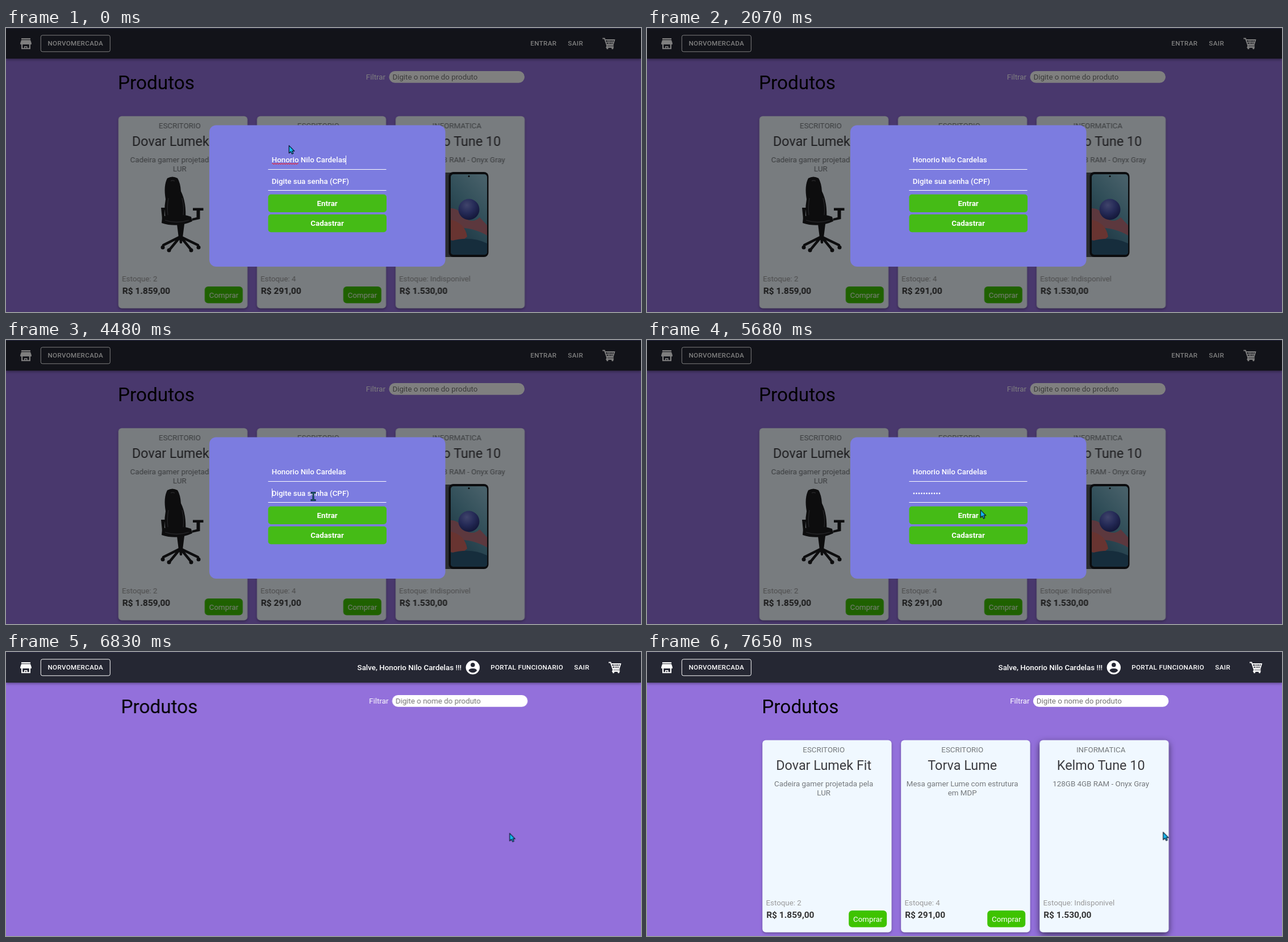
Animation, 1118 px wide and 501 px high, one loop 8000 ms. Source, as an HTML page:

```html
<!DOCTYPE html>
<html lang="pt-BR">
<head>
<meta charset="utf-8">
<title>Produtos</title>
<style>
html, body { margin: 0; width: 100%; height: 100%; overflow: hidden; background: #9370db; }
svg { display: block; width: 1118px; height: 501px; font: 13.333px Roboto, sans-serif; }
.mid { text-anchor: middle; }
.white { fill: #fff; }
.menu { font-size: 11.667px; font-weight: 500; letter-spacing: .333px; fill: #fff; }
.bar { fill: #252733; filter: drop-shadow(0 2px 2px rgba(0,0,0,.35)); }
.line { fill: none; stroke: #fff; }
.hint { fill: #757575; }
.paper { fill: #f0f8ff; filter: drop-shadow(0 2px 2px rgba(0,0,0,.3)); }
.soft { fill: #74787b; text-anchor: middle; }
.name { font-size: 23.4px; fill: #3c3c40; text-anchor: middle; }
.stock { fill: #999; }
.price { font-size: 15.5px; font-weight: 700; fill: #333; }
.buy { fill: #3ec300; }
.field { font-weight: 500; fill: #fff; }
.action { fill: #45bb16; }
.label { font-weight: 700; fill: #fff; text-anchor: middle; }

/* 8 s loop: 1% = 80 ms, hard changes unless a keyframe says otherwise */
.before, .after, .page, .cards, .lift, .press, .caret1, .squiggle, .caret2, .caret3,
.empty, .dots, .cursor, .arrow, .beam { animation: 8s step-end infinite; }
.before { animation-name: before; }
.after { animation-name: after; }
.page { animation-name: page; }
.cards { animation-name: cards; }
.lift { animation-name: lift; }
.press { animation-name: press; }
.caret1 { animation-name: caret1; }
.squiggle { animation-name: squiggle; }
.caret2 { animation-name: caret2; }
.caret3 { animation-name: caret3; }
.empty { animation-name: empty; }
.dots { animation-name: dots; }
.cursor { animation-name: cursor; }
.arrow { animation-name: arrow; }
.beam { animation-name: beam; }

@keyframes before { 0% { opacity: 1 } 85.375%, 100% { opacity: 0 } }
@keyframes after { 0% { opacity: 0 } 85.375%, 100% { opacity: 1 } }
@keyframes page { 0% { transform: translate(-5.4px, 0) } 85.375%, 100% { transform: none } }
@keyframes cards { 0% { opacity: 1 } 85.375% { opacity: 0 } 93.625%, 100% { opacity: 1 } }
@keyframes lift {
  0% { filter: drop-shadow(0 2px 2px rgba(0,0,0,.3)) }
  94.625%, 100% { filter: drop-shadow(0 4px 6px rgba(0,0,0,.6)) }
}
@keyframes press { 0% { fill: #45bb16 } 79%, 100% { fill: #4acb14 } }
@keyframes caret1 {
  0%, 9%, 21.5% { opacity: 1 }
  2.75%, 15.25%, 25.875%, 100% { opacity: 0 }
}
@keyframes squiggle { 0% { opacity: 1 } 25.875%, 100% { opacity: 0 } }
@keyframes caret2 { 0% { opacity: 0 } 52.875% { opacity: 1 } 58.25%, 100% { opacity: 0 } }
@keyframes caret3 { 0% { opacity: 0 } 58.25% { opacity: 1 } 64.5%, 100% { opacity: 0 } }
@keyframes empty { 0% { opacity: 1 } 58.25%, 100% { opacity: 0 } }
@keyframes dots { 0% { opacity: 0 } 58.25%, 100% { opacity: 1 } }
@keyframes arrow {
  0%, 42.25%, 63% { opacity: 1 }
  12.125%, 49% { opacity: 0 }
  100% { opacity: 1 }
}
@keyframes beam { 0% { opacity: 0 } 49% { opacity: 1 } 63%, 100% { opacity: 0 } }
@keyframes cursor {
  0% { transform: translate(498px, 207px) }
  .75% { transform: translate(502px, 208px) }
  2.375% { transform: translate(507.5px, 210.5px) }
  5% { transform: translate(512px, 210.5px) }
  5.75% { transform: translate(516.5px, 210px) }
  8.375% { transform: translate(516.5px, 210px); animation-timing-function: steps(3, start) }
  10.625% { transform: translate(262px, 300px); animation-timing-function: steps(2, start) }
  12.125% { transform: translate(67.5px, 332px) }
  42.25% { transform: translate(110px, 411px) }
  43% { transform: translate(110px, 411px); animation-timing-function: steps(6, start) }
  47.5% { transform: translate(531.5px, 275px) }
  49% { transform: translate(539.5px, 276px) }
  50.125% { transform: translate(540px, 277px) }
  52.875% { transform: translate(544px, 278px) }
  53.375% { transform: translate(541px, 276px) }
  56.875% { transform: translate(542px, 270px) }
  57.625% { transform: translate(543px, 265px) }
  59.625% { transform: translate(545px, 267px) }
  62.25% { transform: translate(545px, 267px); animation-timing-function: steps(3, start) }
  64.5% { transform: translate(589px, 308px) }
  65.25% { transform: translate(583.5px, 299.5px) }
  71% { transform: translate(587px, 299.5px) }
  71.75% { transform: translate(590.5px, 300px) }
  79% { transform: translate(590.5px, 300px); animation-timing-function: steps(9, start) }
  85.1875% { transform: translate(886.5px, 319.5px) }
  93.625% { transform: translate(886.5px, 319.5px); animation-timing-function: steps(3, start) }
  96.625%, 100% { transform: translate(908.5px, 317.5px) }
}
</style>
</head>
<body>
<svg viewBox="0 0 1118 501">
  <defs>
    <linearGradient id="screen" x1=".8" y1="0" x2=".3" y2="1">
      <stop offset="0" stop-color="#8fc0d2"/>
      <stop offset=".45" stop-color="#5f9bb0"/>
      <stop offset="1" stop-color="#37647f"/>
    </linearGradient>
    <radialGradient id="ball" cx=".4" cy=".3" r=".75">
      <stop offset="0" stop-color="#8189d6"/>
      <stop offset=".5" stop-color="#4a55ae"/>
      <stop offset="1" stop-color="#232a6c"/>
    </radialGradient>
    <clipPath id="glass"><rect x="783" y="258" width="64" height="142" rx="5"/></clipPath>
    <rect id="paper" y="155.5" width="227.4" height="339" rx="6"/>
    <g id="buy">
      <rect class="buy" x="152" y="456" width="67" height="29.5" rx="6"/>
      <text class="white mid" x="185.5" y="475.5">Comprar</text>
    </g>
    <g id="cart" fill="none" stroke="#fff" stroke-width="1.8">
      <path d="M0 1.5h3.5l4.5 13h11.5M4.5 4h16.5l-2.5 8H7.5"/>
      <path d="M5.5 8h14M9.5 4l1 8M13 4v8M17 4l-1 8" stroke-width="1.3"/>
      <path d="M8 14.500l-1 2.500h12.500"/>
      <circle cx="8.500" cy="18.800" r="1.700" fill="#fff" stroke="none"/>
      <circle cx="17.500" cy="18.800" r="1.700" fill="#fff" stroke="none"/>
    </g>
  </defs>

  <rect width="1118" height="501" fill="#9370db"/>

  <!-- catalogue -->
  <g class="page">
    <text x="202.3" y="107.500" font-size="33.4">Produtos</text>
    <text class="white" x="639.200" y="91">Filtrar</text>
    <rect class="white" x="679.800" y="76" width="238.600" height="20.800" rx="10.400"/>
    <text class="hint" x="685.800" y="91">Digite o nome do produto</text>

    <g class="cards">
      <g transform="translate(203.200)">
        <use href="#paper" class="paper"/>
        <text class="soft" x="108" y="176.500">ESCRITORIO</text>
        <text class="name" x="108" y="208.300">Dovar Lumek Fit</text>
        <text class="soft" x="108" y="237">Cadeira gamer projetada pela</text>
        <text class="soft" x="108" y="252.800">LUR</text>
        <text class="stock" x="6.300" y="447">Estoque: 2</text>
        <text class="price" x="7" y="468.500">R$ 1.859,00</text>
        <use href="#buy"/>
      </g>
      <g transform="translate(447.200)">
        <use href="#paper" class="paper"/>
        <text class="soft" x="108" y="176.500">ESCRITORIO</text>
        <text class="name" x="108" y="208.300">Torva Lume</text>
        <text class="soft" x="108" y="237">Mesa gamer Lume com estrutura</text>
        <text class="soft" x="108" y="252.800">em MDP</text>
        <text class="stock" x="6.300" y="447">Estoque: 4</text>
        <text class="price" x="7" y="468.500">R$ 291,00</text>
        <use href="#buy"/>
      </g>
      <g transform="translate(691.200)">
        <use href="#paper" class="paper lift"/>
        <text class="soft" x="108" y="176.500">INFORMATICA</text>
        <text class="name" x="108" y="208.300">Kelmo Tune 10</text>
        <text class="soft" x="108" y="237">128GB 4GB RAM - Onyx Gray</text>
        <text class="stock" x="6.300" y="447">Estoque: Indisponivel</text>
        <text class="price" x="7" y="468.500">R$ 1.530,00</text>
      </g>
    </g>
  </g>

  <!-- product pictures -->
  <g class="before">
    <g fill="#1b1b1d">
      <path d="M284 265Q293 260 302 265Q307 273 308 288Q318 308 316 338L282 337Q277 325 281 302Q277 278 284 265z"/>
      <path d="M275 333Q300 324 326 333L328 341Q302 353 274 344z"/>
      <path d="M329 317.500h18.500v4.500h-6v15l-14 3v-4l8-2v-12h-6.500zM273 317h9v4h-3v16h-4z"/>
      <path d="M301 346h13l-3 24h-7z"/>
    </g>
    <path d="M307 368L277 383M307 368L338 383M307 368L288 391M307 368L325 390M307 368L308 378"
      fill="none" stroke="#1b1b1d" stroke-width="4.500" stroke-linecap="round"/>
    <g fill="#1b1b1d">
      <circle cx="276" cy="387" r="3.500"/><circle cx="339" cy="387" r="3.500"/>
      <circle cx="287" cy="392" r="3.500"/><circle cx="326" cy="392" r="3.500"/>
    </g>
    <path d="M290 270q3-2 7 0M286 300q-3 16-1 30M310 300q4 16 2 30M280 339q20 7 42 0" fill="none" stroke="#4b4b50" stroke-width="1.300"/>

    <rect x="752" y="255" width="60" height="149" rx="9" fill="#55585e"/>
    <rect x="779.500" y="254" width="70" height="150" rx="8" fill="#17181c"/>
    <g clip-path="url(#glass)">
      <rect x="783" y="258" width="64" height="142" fill="url(#screen)"/>
      <path d="M783 318Q798 318 806 334Q822 346 834 334L847 348V366Q820 350 783 352z" fill="#b9707c"/>
      <path d="M783 338Q808 344 812 368Q800 380 783 374z" fill="#d06863"/>
      <path d="M783 376Q818 366 847 380V400H783z" fill="#2c5a78"/>
    </g>
    <circle cx="815" cy="320" r="18.500" fill="url(#ball)"/>
    <circle cx="815" cy="261.500" r="1.500" fill="#111"/>
  </g>

  <!-- header -->
  <rect class="bar" width="1118" height="54"/>
  <g class="white">
    <path d="M27 18h16v2.200H27zM27 21.300h16l1.800 5.200v2.500H25.200v-2.500z"/>
    <path d="M27 29h2.200v6.200h11.600V29H43v8.300H27zM32 32h5.500v4H36v-2.400h-2.500V36H32z"/>
  </g>
  <rect class="line" x="61.300" y="12.800" width="122" height="29" rx="3"/>
  <text class="menu mid" x="122.300" y="31">NORVOMERCADA</text>

  <g class="before">
    <text class="menu" x="923.300" y="31">ENTRAR</text>
    <text class="menu" x="989.300" y="31">SAIR</text>
    <use href="#cart" x="1050.300" y="17"/>
  </g>
  <g class="after">
    <text class="field" x="618.600" y="32">Salve, Honorio Nilo Cardelas !!!</text>
    <circle class="white" cx="821.800" cy="27.300" r="12.200"/>
    <circle cx="821.800" cy="22.700" r="3.800" fill="#252733"/>
    <path d="M814.500 32.700Q815 28.900 821.800 28.900T829.100 32.700Q826.500 36.400 821.800 36.400T814.500 32.700z" fill="#252733"/>
    <text class="menu" x="853.200" y="31">PORTAL FUNCIONARIO</text>
    <text class="menu" x="1000.300" y="31">SAIR</text>
    <use href="#cart" x="1061" y="17"/>
  </g>

  <!-- login dialog -->
  <g class="before">
    <rect width="1118" height="501" opacity=".5"/>
    <rect x="358" y="171.500" width="415.500" height="249.500" rx="12" fill="#7c7ce0"/>
    <text class="field" x="467.800" y="237">Honorio Nilo Cardelas</text>
    <path class="squiggle" d="M468.500 239.500q1 -2 2 0t2 0 2 0 2 0 2 0 2 0 2 0 2 0 2 0 2 0 2 0 2 0 2 0 2 0 2 0 2 0 2 0 2 0 2 0 2 0 2 0 2 0 2 0"
      fill="none" stroke="#e0304a" stroke-width="1.200"/>
    <rect class="white caret1" x="598" y="225" width="1" height="16"/>
    <path class="line" d="M461.500 249.500h208M461.500 286.500h208"/>
    <text class="field empty" x="467.800" y="275">Digite sua senha (CPF)</text>
    <text class="white dots" x="467.800" y="275">•••••••••••</text>
    <rect class="white caret2" x="468" y="262" width="1" height="16"/>
    <rect class="white caret3" x="517.500" y="262" width="1" height="16"/>
    <rect class="action press" x="461.500" y="293.500" width="208.500" height="31.500" rx="5"/>
    <rect class="action" x="461.500" y="328.800" width="208.500" height="31.500" rx="5"/>
    <text class="label" x="565.600" y="314">Entrar</text>
    <text class="label" x="565.600" y="349">Cadastrar</text>
  </g>

  <rect width="1118" height="1" fill="#282843"/>

  <!-- pointer -->
  <g class="cursor">
    <path class="arrow" d="M.3 .3V13.800L3.400 11L5.600 15.300L7.800 14.300L5.800 10.100H9.800z" fill="#14b8ee" stroke="#0c1426" stroke-width="1.200" stroke-linejoin="round"/>
    <g class="beam" fill="none">
      <path d="M-4.500 -6.500H4.500M0 -6.500V6.500M-4.500 6.500H4.500" stroke="#0c1c2e" stroke-width="3"/>
      <path d="M-3.500 -6.500H3.500M0 -6.500V6.500M-3.500 6.500H3.500" stroke="#1c7f9c" stroke-width=".9"/>
    </g>
  </g>
</svg>
</body>
</html>
```
